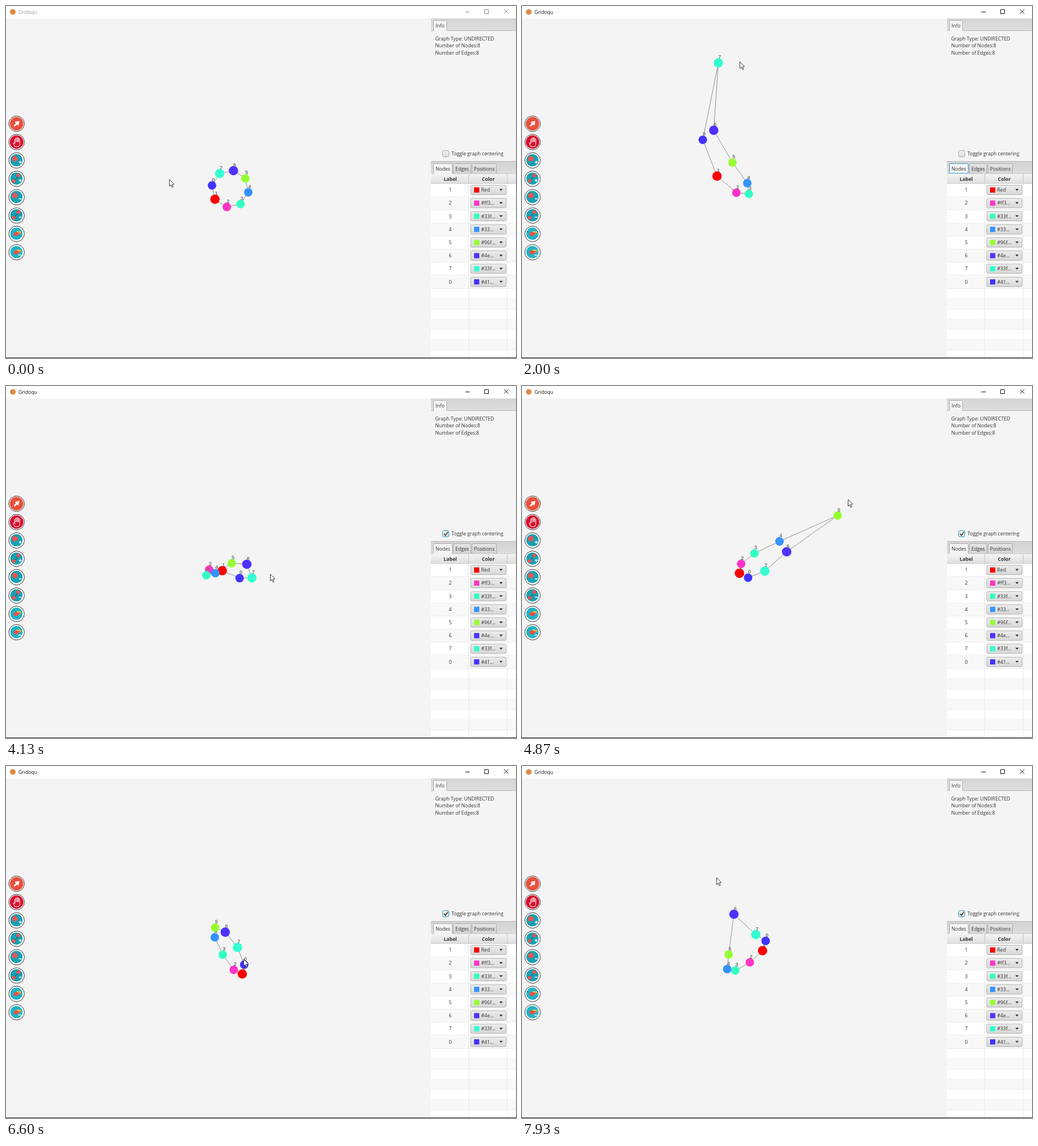
Recreate the animation shown at these times as an HTML page with a canvas. Size 900 by 622 pixels, loop 8 s.

```html
<!DOCTYPE html>
<html lang="en">
<head>
<meta charset="utf-8">
<title>Graph editor</title>
<style>
html, body { margin: 0; width: 100%; height: 100%; overflow: hidden; background: #f4f4f4; }
canvas { display: block; width: 900px; height: 622px; }
</style>
</head>
<body>
<canvas id="stage"></canvas>
<script>
const W = 900, H = 622, LOOP = 8000, STEP = 1000 / 15;
const PRESS = 14, CHECK = 52;   // steps at which the window and the checkbox are clicked
const HOME = [395, 324];
const canvas = document.getElementById('stage');
const dpr = window.devicePixelRatio || 1;
canvas.width = W * dpr;
canvas.height = H * dpr;
const c = canvas.getContext('2d');
const UI = '"Open Sans", "Noto Sans", sans-serif';
const COLORS = ['#4133ff', '#ff0000', '#ff33c5', '#33ffc4', '#3393ff', '#96ff33', '#4e33ff', '#33ffd3'];
const ORDER = [1, 2, 3, 4, 5, 6, 7, 0];

const clamp = v => Math.max(0, Math.min(1, v));
const smooth = v => { v = clamp(v); return v * v * (3 - 2 * v); };
const easeOut = v => 1 - (1 - clamp(v)) ** 2;
const mix = (a, b, u) => a.map((p, i) => p.map((v, j) => v + (b[i][j] - v) * u));

// Pointer route: step, x, y
const route = [
  [0, 288, 306], [6, 66, 208], [12, 377, 294], [14, 377, 294], [26, 266, 125], [30, 384, 98],
  [34, 543, 150], [40, 545, 400], [44, 791, 270], [47, 815, 262], [51, 778, 258], [53, 778, 258],
  [62, 466, 332], [66, 402, 313], [68, 402, 313], [73, 575, 200], [77, 415, 70], [81, 236, 83],
  [83, 182, 115], [91, 345, 165], [99, 419, 341], [101, 390, 301], [106, 583, 185],
  [111, 415, 124], [114, 308, 145], [117, 346, 200], [119, 343, 197]
];

// Monotone cubic through the route, so pauses stay still
function pointer(k) {
  let n = 0;
  while (n < route.length - 2 && route[n + 1][0] <= k) n++;
  const a = route[n], b = route[n + 1], h = b[0] - a[0], u = (k - a[0]) / h, v = 1 - u;
  const slope = (m, i) => (route[m + 1][i] - route[m][i]) / (route[m + 1][0] - route[m][0]);
  const tangent = (m, i) => {
    if (m === 0 || m === route.length - 1) return 0;
    const p = slope(m - 1, i), q = slope(m, i);
    return p * q > 0 ? 2 * p * q / (p + q) : 0;
  };
  return [1, 2].map(i => a[i] * v * v * (1 + 2 * u) + b[i] * u * u * (3 - 2 * u) +
    h * u * v * (v * tangent(n, i) - u * tangent(n + 1, i)));
}

// Closed chain from node `lead` at head to the opposite node at tail.
// A longer chain bunches towards its tail; the rest shifts points across or along the axis.
function chain(lead, head, tail, { width = 0, bend = 0, lean = 0, twist = 0, bunch } = {}) {
  const dx = tail[0] - head[0], dy = tail[1] - head[1], len = Math.hypot(dx, dy) || 1;
  const power = bunch || Math.min(1, (65 / len) ** .8);
  return COLORS.map((_, i) => {
    const angle = (i - lead) * Math.PI / 4;
    const a = ((1 - Math.cos(angle)) / 2) ** power;
    const along = a + lean * Math.sin(angle) / len;
    const off = (width * Math.sin(angle) + twist * Math.sin(2 * angle) + 4 * a * (1 - a) * bend) / len;
    return [head[0] + dx * along + dy * off, head[1] + dy * along - dx * off];
  });
}

const round = chain(7, [377, 296], [414, 350], { width: -32.5 });
const flat = chain(7, [472, 282], [385, 276], { width: 2.6, bend: -25, lean: 9, twist: 2.5 });
const centred = chain(7, [434, 339], [353.5, 334.5], { width: 7, bend: -17, lean: 8, twist: 7.7 });
const slant = chain(5, [369, 285.5], [417, 367.5], { width: 14.5, bend: 2, lean: 1, bunch: .95 });
const kite = chain(6, [374, 262], [402, 347], { width: 40, bend: -3, lean: -13, bunch: .25 });

// Each drag: the node, when it is held, and how far the far end recoils
const drags = [
  { node: 7, grab: 14, drop: 40, settle: 44, recoil: .04, width: -16, from: round, to: flat },
  { node: 5, grab: 68, drop: 91, settle: 97, recoil: .43, width: 17, from: centred, to: slant },
  { node: 6, grab: 101, drop: 115, settle: 119, recoil: .43, width: 17, from: slant, to: kite }
];

// The held node trails the pointer by a step, the chain trails the node by three
function held(d, k) {
  const head = pointer(Math.max(d.grab, k - 1)), past = pointer(Math.max(d.grab, k - 4));
  const tail = HOME.map((v, i) => v - d.recoil * (past[i] - v));
  const dx = tail[0] - head[0], dy = tail[1] - head[1];
  const drift = ((head[0] - past[0]) * dy - (head[1] - past[1]) * dx) / (Math.hypot(dx, dy) || 1);
  const pulled = chain(d.node, head, tail, { width: d.width, bend: -.55 * drift, lean: 8.5 });
  const pose = mix(d.from, pulled, smooth((k - d.grab) / 7));
  pose[d.node] = head;
  return pose;
}

function poseAt(k) {
  const d = drags.filter(e => k >= e.grab).pop();
  if (!d) return round;
  if (k <= d.drop) return held(d, k);
  const rest = d.to === flat ? mix(flat, centred, smooth((k - CHECK - 1) / 6)) : d.to;
  return mix(held(d, d.drop), rest, easeOut((k - d.drop) / (d.settle - d.drop)));
}

function box(x, y, w, h, fill, stroke, r = 0) {
  c.beginPath();
  c.roundRect(x, y, w, h, r);
  if (fill) { c.fillStyle = fill; c.fill(); }
  if (stroke) { c.strokeStyle = stroke; c.stroke(); }
}
function disc(x, y, r, fill, stroke) {
  c.beginPath();
  c.arc(x, y, r, 0, 7);
  c.fillStyle = fill;
  c.fill();
  if (stroke) { c.strokeStyle = stroke; c.stroke(); }
}
function trace(pts) {
  c.beginPath();
  for (let i = 0; i < pts.length; i += 2) c.lineTo(pts[i], pts[i + 1]);
}
function path(pts, stroke, width = 1) {
  trace(pts);
  c.strokeStyle = stroke;
  c.lineWidth = width;
  c.stroke();
  c.lineWidth = 1;
}
function shape(pts, fill) {
  trace(pts);
  c.closePath();
  c.fillStyle = fill;
  c.fill();
}
function text(s, x, y, { color = '#333', align = 'left', font = '8.65px ' + UI } = {}) {
  c.font = font;
  c.textAlign = align;
  c.fillStyle = color;
  c.fillText(s, x, y);
}
function shade(y, h, top, bottom) {
  const g = c.createLinearGradient(0, y, 0, y + h);
  g.addColorStop(0, top);
  g.addColorStop(1, bottom);
  return g;
}
function clip(s, room) {
  c.font = '8.65px ' + UI;
  if (c.measureText(s).width <= room) return s;
  while (c.measureText(s + '...').width > room) s = s.slice(0, -1);
  return s + '...';
}

function titleBar(active) {
  box(0, 0, W, 22, '#fff');
  disc(12, 10.5, 5, '#e08a45');
  text('Gridoqu', 22, 13.5, { color: active ? '#111' : '#999' });
  const ink = active ? '#111' : '#888';
  path([810.5, 10.5, 818.5, 10.5], ink);
  box(844.5, 6.5, 7, 7, null, ink);
  path([879, 6, 886.5, 13.5], ink);
  path([886.5, 6, 879, 13.5], ink);
}

const sign = plus => {
  path([4, 3, 9, 3], '#fff', 1.5);
  if (plus) path([6.5, .5, 6.5, 5.5], '#fff', 1.5);
};
const dot = plus => { disc(-3, -3, 4.8, '#ee5350'); sign(plus); };
const link = plus => {
  path([-5, 5, 3, -6], '#333');
  disc(3, -6, 3.2, '#ee5350');
  disc(-5, 4, 3.2, '#ee5350');
  sign(plus);
};
const eraser = minus => {
  shape([-6, 0, 1, -5, 8, -4, 8, -1, 0, 2], '#f6cf3c');
  shape([-6, -1, 0, -4, 5, 0, 0, 4, -4, 3], '#ee4d46');
  path([-1, -1, 7, -2], '#ee4d46', 1.5);
  if (minus) path([3, 5, 8, 5], '#fff', 1.4);
};
const arrow = () => shape([5, -5, 3, 3.5, 1, 1.2, -3.5, 5.3, -5.3, 3.5, -1.2, -1, -3.5, -3], '#fff');
const hand = () => {
  c.beginPath();
  c.moveTo(-3, 8);
  c.lineTo(-6, 2);
  c.lineTo(-4.5, 1);
  c.lineTo(-3, 3);
  for (let i = 0; i < 4; i++) {
    const x = -3.5 + i * 2.3, top = -7 + 1.1 * (i - 1.6) ** 2;
    c.arc(x + 1.1, top, 1.1, Math.PI, 0);
    c.lineTo(x + 2.2, 0);
  }
  c.lineTo(5.7, 4);
  c.lineTo(4, 8);
  c.closePath();
  c.strokeStyle = '#fff';
  c.stroke();
};

function toolbar() {
  const tools = [arrow, hand, () => dot(true), () => link(true), () => dot(false), () => link(false),
    () => eraser(false), () => eraser(true)];
  tools.forEach((icon, i) => {
    c.save();
    c.translate(18.7, 208 + i * 32.45);
    disc(0, 0, 13.7, '#fff', '#333');
    if (i < 2) disc(0, 0, 11.9, i ? '#d80f2c' : '#e9513b');
    else disc(-.3, -.4, 10.8, i < 6 ? '#18a0b3' : '#20b2c6');
    icon();
    c.restore();
  });
}

function tab(x, y, w, h, label, selected, focus) {
  box(x + .5, y + .5, w - 1, h, selected ? '#f4f4f4' : shade(y, h, '#e6e6e6', '#d2d2d2'), '#acacac', [2, 2, 0, 0]);
  if (selected) box(x + 1, y + h - 1, w - 2, 3, '#f4f4f4');
  if (focus) box(x + .5, y + .5, w - 1, h - 1, null, '#28a4cb', 1.5);
  text(label, x + w / 2, y + 12.5, { align: 'center' });
}

function table() {
  box(750, 297, 150, H - 297, '#fff');
  box(750, 296.5, 150, 17.5, shade(297, 17, '#f3f3f3', '#dedede'));
  path([750, 313.5, 900, 313.5], '#c8c8c8');
  const bold = { align: 'center', font: 'bold 8.65px ' + UI };
  text('Label', 784, 308.7, bold);
  text('Color', 851, 308.7, bold);
  const pitch = 23.2;
  for (let row = 0, y = 314; y < H; row++) {
    const h = row < 8 ? pitch : 18;
    if (row % 2) box(750, y, 150, h, '#f8f8f8');
    y += h;
    path([750, Math.round(y) - .5, 900, Math.round(y) - .5], '#ededed');
  }
  for (const x of [816.5, 884.5]) {
    path([x, 314, x, H], '#e9e9e9');
    path([x, 297, x, 314], '#c4c4c4');
  }
  ORDER.forEach((id, row) => {
    const mid = 325 + row * pitch, color = COLORS[id];
    text(id, 784, mid + 3.2, { align: 'center' });
    box(820, mid - 8.3, 62.5, 16.8, shade(mid - 8, 17, '#ececec', '#d6d6d6'), '#b2b2b2', 2);
    box(826, mid - 4.5, 9.2, 9.2, color);
    text(color === '#ff0000' ? 'Red' : clip(color, 26.3), 838.5, mid + 3.2);
    shape([870.6, mid - 1.7, 876.6, mid - 1.7, 873.6, mid + 1.7], '#333');
  });
}

function sidePanel(k) {
  box(750, 22, 150, 21.5, shade(22, 21, '#d5d5d5', '#dddddd'));
  path([750, 43.5, 900, 43.5], '#b4b4b4');
  tab(754, 25, 24, 18, 'Info', true, false);
  ['Graph Type: UNDIRECTED', 'Number of Nodes:8', 'Number of Edges:8']
    .forEach((s, i) => text(s, 757.5, 60.6 + i * 12.8));

  const checked = k >= CHECK;
  box(770.5, 255.5, 11, 11, shade(255, 12, '#f0f0f0', '#dddddd'), checked ? '#28a4cb' : '#aaa', 2);
  if (checked) path([773, 261, 775.5, 264, 780, 257.6], '#333', 1.5);
  text('Toggle graph centering', 786, 264);

  box(750, 274.5, 150, 22, shade(275, 21, '#d2d2d2', '#dcdcdc'));
  path([750, 274.5, 900, 274.5], '#bcbcbc');
  path([750, 296.5, 900, 296.5], '#b4b4b4');
  tab(754, 278, 34, 18, 'Nodes', true, k >= PRESS && k < CHECK);
  tab(789, 278, 32, 18, 'Edges');
  tab(822, 278, 44, 18, 'Positions');
  table();
}

function graph(nodes) {
  nodes.forEach((p, i) => path([...p, ...nodes[(i + 1) % 8]], '#7c7c7c', .85));
  for (const id of ORDER) {
    const [x, y] = nodes[id];
    disc(x, y, [1, 6, 7].includes(id) ? 8.3 : 7.5, COLORS[id]);
    text(id, x + 2.3, y - 7.3, {
      color: '#777', align: 'center', font: 'bold 9.5px "Liberation Sans", Arial, sans-serif'
    });
  }
}

function cursor([x, y]) {
  c.save();
  c.translate(x + .5, y + .5);
  const outline = [0, 0, 0, 12, 2.7, 9.5, 4.7, 14, 6.5, 13.2, 4.6, 8.8, 8.2, 8.5, 0, 0];
  shape(outline, '#fff');
  path(outline, '#222', .9);
  c.restore();
}

function draw(now) {
  const k = Math.min(119, Math.floor((now % LOOP + 4) / STEP));
  c.setTransform(dpr, 0, 0, dpr, 0, 0);
  c.lineWidth = 1;
  box(0, 0, W, H, '#f4f4f4');
  titleBar(k >= PRESS);
  toolbar();
  sidePanel(k);
  graph(poseAt(k));
  box(0, 621, W, 1, '#333');
  cursor(pointer(k));
}

const start = performance.now();
function tick() {
  draw(performance.now() - start);
  requestAnimationFrame(tick);
}
tick();
</script>
</body>
</html>
```
